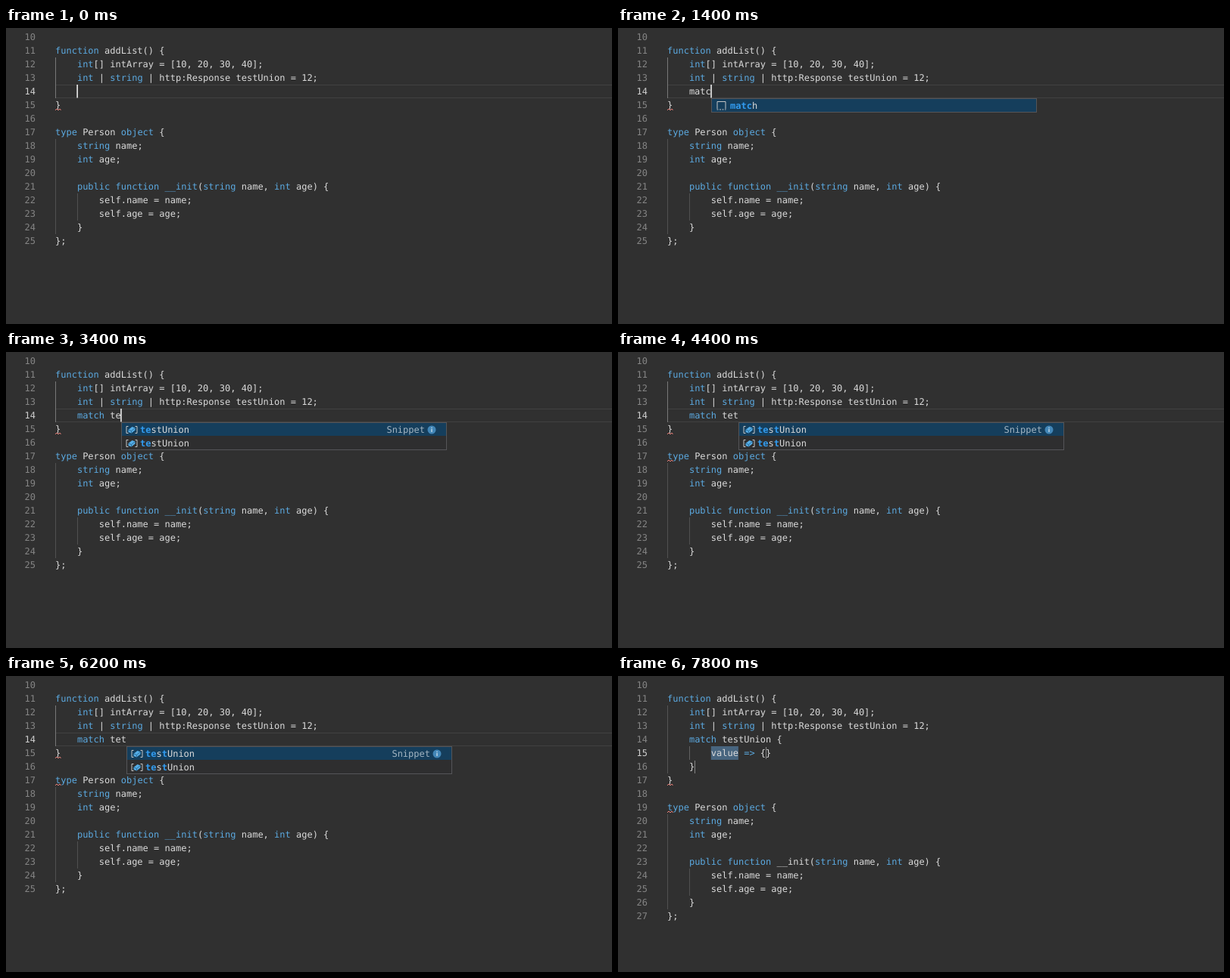
An HTML page that plays this animation: 800x392 px, repeating every 8000 ms.

```html
<!DOCTYPE html>
<html lang="en">
<head>
<meta charset="utf-8">
<title>Editor completion</title>
<style>
  html, body { margin: 0; width: 100%; height: 100%; overflow: hidden; background: #303030; }
  svg { display: block; width: 100%; height: 100%; }
  text {
    font: 12px "DejaVu Sans Mono", monospace;
    fill: #dadada; white-space: pre; text-rendering: geometricPrecision;
  }
  .key { fill: #5ba9e0; }
  .num { fill: #858585; }
  .now { fill: #d0d0d0; }
  .hit { fill: #329cf0; font-weight: bold; }
  .detail { fill: #a3b5c2; }
  .line { fill: none; stroke-width: 1; }
</style>
</head>
<body>
<svg id="stage" viewBox="0 0 800 392"></svg>
<script>
const LOOP = 8000, CHAR = 7.224, ROW = 18, LEFT = 65;
const ACCEPTED = 7200, WARNED = 3900;
const stage = document.getElementById('stage');

const head = [
  '',
  'function addList() {',
  '    int[] intArray = [10, 20, 30, 40];',
  '    int | string | http:Response testUnion = 12;'
];
const tail = [
  '}',
  '',
  'type Person object {',
  '    string name;',
  '    int age;',
  '',
  '    public function __init(string name, int age) {',
  '        self.name = name;',
  '        self.age = age;',
  '    }',
  '};'
];
const snippet = ['    match testUnion {', '        value => {}', '    }'];

const matchItems = [['map', 'struct'], ['match', 'snippet'], ['ballerina/lang.map', 'module'], ['ballerina/math', 'module']];
const unionItems = [['testUnion', 'variable'], ['testUnion', 'variable']];
const unionType = '(int|string|ballerina/http:Response)';

// time, typed text, completion items, query, selected row, detail
const steps = [
  [0, ''],
  [500, 'm'],
  [600, 'm', matchItems, 'm', 0, 'Map'],
  [900, 'ma', matchItems, 'ma', 0, 'Map'],
  [1180, 'mat', matchItems, 'mat', 0, ''],
  [1270, 'matc', matchItems, 'matc', 0, ''],
  [1600, 'matc', matchItems, 'matc', 0, 'Snippet'],
  [2000, 'match '],
  [3100, 'match t'],
  [3200, 'match t', unionItems, 't', 0, 'Snippet'],
  [3300, 'match te', unionItems, 'te', 0, 'Snippet'],
  [3500, 'match tet', unionItems, 'tet', 0, 'Snippet'],
  [4800, 'match tet', unionItems, 'tet', 1, unionType],
  [6000, 'match tet', unionItems, 'tet', 0, 'Snippet']
];
const cursorShown = [
  [0, 100], [500, 1700], [2000, 2500], [3000, 4000], [4500, 5000],
  [5450, 6000], [6500, 7000], [7200, 7700]
];

const column = n => LEFT + n * CHAR;
const baseline = n => 34 + (n - 11) * ROW;
const rowTop = n => baseline(n) - 13;
const text = (x, y, body, cls = '') => `<text x="${x}" y="${y}" class="${cls}">${body}</text>`;
const rect = (x, y, w, h, fill, more = '') =>
  `<rect x="${x}" y="${y}" width="${w}" height="${h}" fill="${fill}" ${more}/>`;
const path = (d, color) => `<path class="line" d="${d}" stroke="${color}"/>`;
const guide = (col, from, to, color = '#505050') =>
  path(`M${Math.round(column(col)) + .5} ${rowTop(from)}V${rowTop(to + 1)}`, color);
const squiggle = line => path(`M65 ${baseline(line) + 3}l2 -2 2 2 2 -2 1.5 2`, '#ec827b');
const span = (cls, s) => `<tspan class="${cls}">${s}</tspan>`;

function highlight(line, plainInit) {
  const safe = line.replace(/=>/g, '=&gt;');
  const words = /=&gt;|\b(?:function|int|string|type|object|public|match|__init)\b/g;
  return safe.replace(words, w => plainInit && w === '__init' ? w : span('key', w));
}

// Indices of query letters inside a label, or null when it does not match.
function fuzzy(label, query) {
  const hits = [];
  let at = -1;
  for (const c of query) {
    at = label.indexOf(c, at + 1);
    if (at < 0) return null;
    hits.push(at);
  }
  return hits;
}

function icon(kind, x, y) {
  const grey = '#c5c5c5';
  if (kind === 'struct')
    return path(`M${x} ${y - 4.5}h6m2 0h6M${x} ${y - 1.5}h4m2 0h8M${x} ${y + 1.5}h7m2 0h3M${x} ${y + 4.5}h4m2 0h8`, grey);
  if (kind === 'snippet')
    return path(`M${x + 1.5} ${y + 4}v-9.5h11v9.5`, grey) +
      `<path class="line" d="M${x + 1} ${y + 5}h12" stroke="${grey}" stroke-width="1.5" stroke-dasharray="2 1.5"/>`;
  if (kind === 'module') return text(x - .5, y + 4, '{}');
  return path(`M${x + 3} ${y - 4.5}h-2.5v9h2.5M${x + 12} ${y - 4.5}h2.5v9h-2.5`, grey) +
    `<path d="M${x + 3} ${y}l5 -4 4 1.5v3l-5 4 -4 -1.5z" fill="#55aee8"/>` +
    path(`M${x + 3} ${y}l4 1.5 5 -4M${x + 7} ${y + 1.5}v3`, '#2b6c99');
}

function popup(x, items, query, selected, detail) {
  const rows = items.map(([label, kind]) => ({ label, kind, hits: fuzzy(label, query) })).filter(r => r.hits);
  const y = 93, h = rows.length * ROW;
  let out = rect(x, y, 430, h, '#2e2e2f');
  rows.forEach((row, i) => {
    const mid = y + 10 + i * ROW;
    if (i === selected) {
      out += rect(x, y + i * ROW, 430, ROW, '#153e5c');
      if (detail) out += text(x + 401 - detail.length * CHAR, mid + 4, detail, 'detail') +
        `<circle cx="${x + 410}" cy="${mid}" r="5.5" fill="#4286b7"/>` +
        rect(x + 409.4, mid - 1, 1.2, 4, '#d5e5f0') + rect(x + 409.4, mid - 3.2, 1.2, 1.3, '#d5e5f0');
    }
    const label = [...row.label].map((c, n) => row.hits.includes(n) ? span('hit', c) : c).join('');
    out += icon(row.kind, x + 6.5, mid) + text(x + 25, mid + 4, label);
  });
  return out + rect(x + .5, y + .5, 429, h, 'none', 'stroke="#555558"');
}

function draw(step, accepted, warned, cursor) {
  const [, typed, items, query, selected, detail] = step;
  const lines = [...head, ...(accepted ? snippet : ['    ' + typed]), ...tail];
  const shift = accepted ? 2 : 0, active = accepted ? 15 : 14;
  let out = rect(0, 0, 800, 392, '#303030');

  if (accepted) {
    out += rect(column(8), rowTop(15), 5 * CHAR, ROW, '#48657f');
    out += guide(4, 15, 15, '#626262');
    out += path(`M195.5 ${rowTop(15) + 1}v16M101.5 ${rowTop(16) + 1}v17`, '#858585');
  } else {
    out += path('M65 75.5H800M65 92.5H800', '#414141');
  }
  out += guide(0, 12, 14 + shift, accepted ? '#555' : '#777');
  out += guide(0, 18 + shift, 24 + shift) + guide(4, 22 + shift, 23 + shift);

  lines.forEach((line, i) => {
    const n = 10 + i;
    out += text(24.6, baseline(n), n, n === active ? 'now' : 'num');
    out += text(LEFT, baseline(n), highlight(line, accepted));
  });

  out += squiggle(15 + shift);
  if (warned) out += squiggle(17 + shift);

  const cursorX = column(accepted ? 13 : 4 + typed.length);
  if (items && !accepted) out += popup(Math.round(cursorX), items, query, selected, detail);
  if (cursor) out += rect(cursorX - .6, rowTop(active), 1.7, 17.5, '#e0e0e0');
  return out;
}

let shown = '';
function render(elapsed) {
  const t = elapsed % LOOP;
  const index = steps.filter(s => s[0] <= t).length - 1;
  const accepted = t >= ACCEPTED, warned = t >= WARNED;
  const cursor = cursorShown.some(([from, to]) => t >= from && t < to);
  const key = [index, accepted, warned, cursor].join();
  if (key !== shown) {
    stage.innerHTML = draw(steps[index], accepted, warned, cursor);
    shown = key;
  }
}

const start = performance.now();
function tick() {
  render(Math.max(0, performance.now() - start));
  requestAnimationFrame(tick);
}
tick();
</script>
</body>
</html>
```
